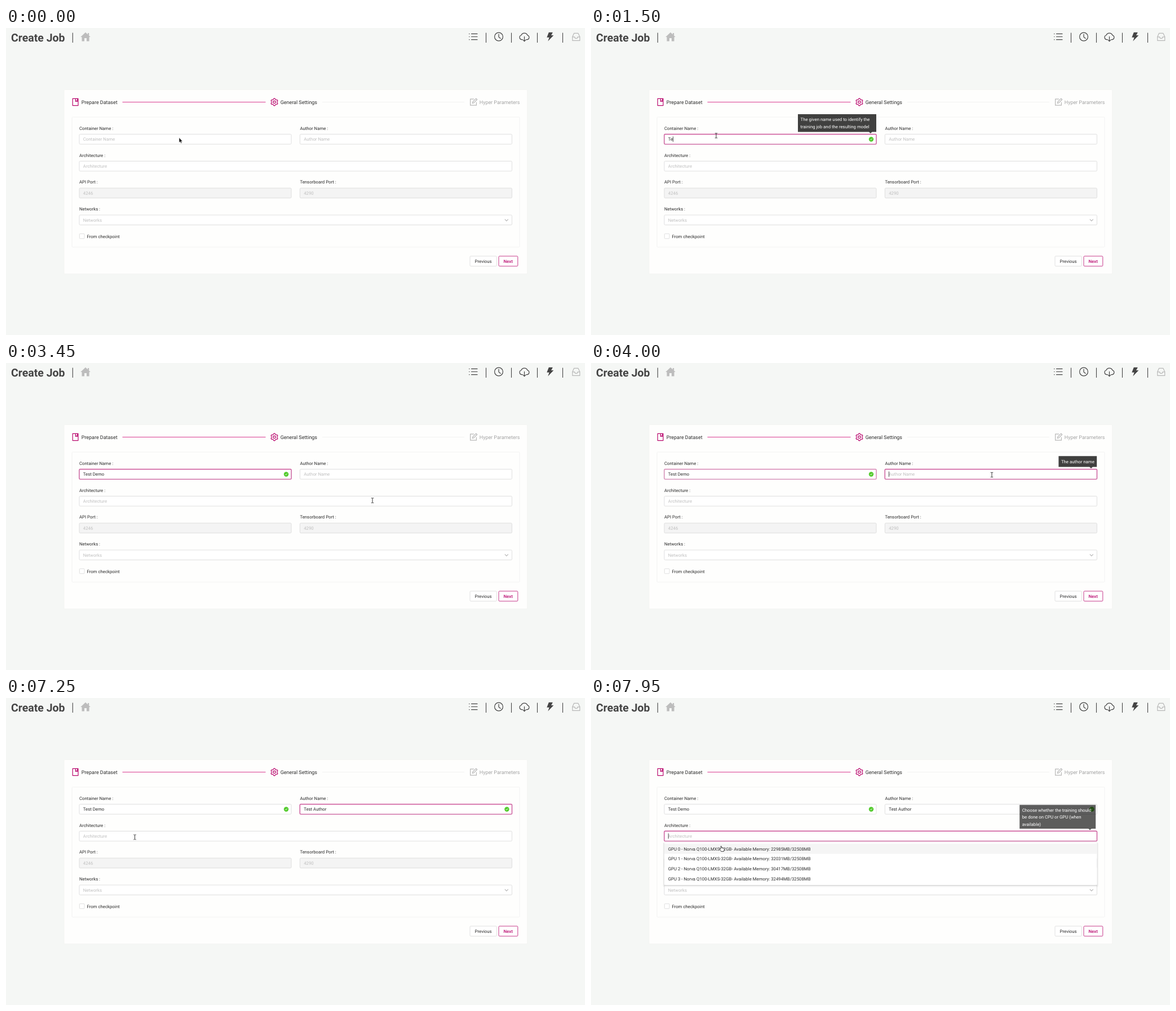
An HTML page for the animation above (8 s loop, 1027 by 545 pixels).

```html
<!DOCTYPE html>
<html lang="en">
<head>
<meta charset="utf-8">
<title>Create Job</title>
<style>
  html, body { margin: 0; width: 100%; height: 100%; overflow: hidden; background: #f5f7f5; }
  svg { display: block; width: 100vw; height: 100vh; }
  text { font: 7.8px Roboto, sans-serif; fill: #2b2b2b; white-space: pre; text-rendering: geometricPrecision; }
  .title { font-size: 19.5px; font-weight: 700; fill: #444; }
  .step { font-size: 8.93px; }
  .muted { fill: #a3a3a3; }
  .hint { fill: #bfbfbf; }
  .tip text { fill: #fff; }
  .line { fill: none; stroke: #444; stroke-width: 1.2; stroke-linecap: round; stroke-linejoin: round; }
  .pink { stroke: #b9086e; }
  .pale { stroke: #b8b8b8; }
  .box { fill: #fff; stroke: #d9d9d9; stroke-width: .8; }
  .off { fill: #f4f4f4; }
  .ring { fill: none; stroke: #c94792; stroke-width: 1.1; }
  .glow { fill: none; stroke: #b9086e; stroke-opacity: .22; stroke-width: 1.2; }
  .caret { fill: #222; }
</style>
</head>
<body>
<svg viewBox="0 0 1027 545" preserveAspectRatio="none">
  <text class="title" x="9" y="24">Create Job</text>
  <path d="M118.3 8.5V26M851.5 8.5V26M896.5 8.5V26M942.5 8.5V26M987.5 8.5V26" stroke="#444" stroke-width="1.1"/>
  <path d="M141 7.8 149.8 16H147.6V23.5H143V18H139V23.5H134.5V16H132.3ZM145 9H147.2V13.4L145 11.4Z" fill="#bdbdbd"/>
  <path class="line" d="M825.5 10.3H836M825.5 15.5H836M825.5 20.7H836M821.6 10.3H822M821.6 15.5H822M821.6 20.7H822" stroke-width="1.5"/>
  <g class="line">
    <circle cx="874" cy="15.5" r="7.4"/>
    <path d="M874 11V16L877.2 18.4"/>
    <path d="M916.3 20.6H914.6A4 4 0 0 1 913.9 12.8A6 6 0 0 1 925 12.8A4 4 0 0 1 924.4 20.6H922.7M919.5 15.4V23.5M917.3 21.4 919.5 23.7 921.7 21.4"/>
  </g>
  <path d="M962.8 7.8H969.8L967 13H971.3L961.3 23.4 963.6 16.8H959.3Z" fill="#444"/>
  <path class="line pale" d="M1004.8 15.6 1007.6 9.3H1014.8L1017.8 15.6V22.3H1004.8ZM1004.8 15.8H1008.6Q1009 18.5 1011.3 18.5T1014 15.8H1017.8"/>

  <rect x="103" y="109.5" width="821.5" height="327" rx="1.5" fill="#fefefd" stroke="#f0f1ef" stroke-width=".6"/>
  <path class="line pink" d="M118.2 125.4H128V137.6H118.2ZM123.4 125.4V130.4L125 129.2 126.6 130.4V125.4"/>
  <text class="step" x="133.8" y="134.8">Prepare Dataset</text>
  <path d="M206.5 131.6H460.5" stroke="#d9378f"/>
  <path id="gear" class="line pink"/>
  <circle class="line pink" cx="476" cy="131.5" r="2.2"/>
  <text class="step" x="486.8" y="134.8">General Settings</text>
  <path d="M561 131.6H813" stroke="#efefef" stroke-width=".8"/>
  <path class="line pale" d="M834.4 132V137.2H823.6V126.2H829.6M827.4 133.6 828 131 833.8 125.2 835.6 127 829.9 132.8Z" stroke-width="1"/>
  <text class="step muted" x="839.8" y="134.8">Hyper Parameters</text>
  <rect x="117" y="158" width="794" height="231" rx="1.5" fill="none" stroke="#efefef" stroke-width=".8"/>

  <g id="form"></g>
  <path class="line pale" d="M885.2 339.8 887.8 342.6 890.4 339.8" stroke-width=".9"/>
  <rect class="box" x="130.4" y="365.2" width="8.6" height="8.6" rx="1"/>
  <text x="143.4" y="372.5">From checkpoint</text>
  <rect class="box" x="823" y="405" width="47.3" height="17.8" rx="1.6"/>
  <text x="831.6" y="416.8">Previous</text>
  <rect class="box" x="874" y="405" width="33.8" height="17.8" rx="1.6" style="stroke:#b9086e"/>
  <text x="882.5" y="416.8" style="fill:#b9086e;font-weight:500">Next</text>

  <g id="menu"></g>
  <g id="tips"></g>
  <g id="cursor">
    <path data-kind="arrow" d="M0 0V9L2 7.2 3.4 10.2 4.9 9.6 3.6 6.7H6.2Z" fill="#111" stroke="#fff" stroke-width=".6"/>
    <path data-kind="beam" d="M-2.2-4.2H-.7L0-3.7 .7-4.2H2.2M0-3.7V3.7M-2.2 4.2H-.7L0 3.7 .7 4.2H2.2" fill="none" stroke="#222" stroke-width=".9"/>
    <path data-kind="hand" d="M-2-4.2Q-1.2-5-.5-4.2V-1.6L3.6-.8Q4.4-.5 4.3 1L3.6 5H-1.2L-4-.2Q-3.6-1.4-2 .4Z" fill="#fff" stroke="#222" stroke-width=".8"/>
  </g>
</svg>
<script>
const LOOP = 8000, STEP = 50;
const $ = id => document.getElementById(id);
const ramp = (t, a, b) => Math.min(1, Math.max(0, (t - a) / (b - a)));
const easeOut = p => 1 - (1 - p) ** 3;
const pulse = (t, a, b, c, d) => easeOut(ramp(t, a, b)) * (1 - ramp(t, c, d));

$('gear').setAttribute('d', 'M' + Array.from({ length: 24 }, (_, i) => {
  const a = i * Math.PI / 12, r = i % 4 < 2 ? 6.4 : 5;
  return `${476 + r * Math.sin(a - .13)} ${131.5 - r * Math.cos(a - .13)}`;
}).join('L') + 'Z');

const fields = [
  { label: 'Container Name', x: 130, y: 188.6, w: 376, focus: [550, 800, 3900, 4200], check: 1250,
    keys: [[1250, 'T'], [1400, 'Te'], [1550, 'Tes'], [1650, 'Test'], [2350, 'Test D'],
      [2550, 'Test De'], [2650, 'Test Dem'], [2750, 'Test Demo']],
    caret: [[550, 1100], [1250, 2000], [2350, 3250]] },
  { label: 'Author Name', x: 521.4, y: 188.6, w: 376, focus: [3850, 4050, 7400, 7700], check: 4550,
    keys: [[4550, 'T'], [4700, 'Te'], [4850, 'Tes'], [4950, 'Test'], [5350, 'Test '], [5550, 'Test A'],
      [5700, 'Test Au'], [5850, 'Test Aut'], [5900, 'Test Auth'], [6050, 'Test Autho'], [6150, 'Test Author']],
    caret: [[3900, 6750], [7300, 7400]] },
  { label: 'Architecture', x: 130, y: 236.4, w: 767.4, focus: [7400, 7650, 9000, 9100], caret: [[7400, LOOP]] },
  { label: 'API Port', hint: '4246', off: true, x: 130, y: 284.2, w: 376 },
  { label: 'Tensorboard Port', hint: '4290', off: true, x: 521.4, y: 284.2, w: 376 },
  { label: 'Networks', x: 130, y: 332, w: 767.4 }
];

$('form').innerHTML = fields.map(({ label, hint = label, off, x, y, w }) => `<g>
  <text x="${x}" y="${y - 7.8}">${label} :</text>
  <rect class="glow" x="${x - .5}" y="${y - .5}" width="${w + 1}" height="18.6" rx="2" opacity="0"/>
  <rect class="box ${off ? 'off' : ''}" x="${x}" y="${y}" width="${w}" height="17.6" rx="1.6"/>
  <rect class="ring" x="${x}" y="${y}" width="${w}" height="17.6" rx="1.6" opacity="0"/>
  <text class="hint" x="${x + 6.8}" y="${y + 11.7}">${hint}</text>
  <text class="value" x="${x + 6.8}" y="${y + 11.7}"></text>
  <g class="check"><circle r="4.2" fill="#52cb2c"/><path d="M-1.8 0-.5 1.4 1.9-1.3" fill="none" stroke="#fff" stroke-width=".9"/></g>
  <rect class="caret" y="${y + 4}" width=".8" height="9.4"/>
</g>`).join('');
[...$('form').children].forEach((g, i) => {
  for (const part of ['ring', 'glow', 'hint', 'value', 'check', 'caret'])
    fields[i][part + 'El'] = g.querySelector('.' + part);
});

const memory = [22985, 32031, 30417, 32494];
$('menu').innerHTML = [7, 4.5, 2].map(s =>
  `<rect x="${130 - s / 3}" y="256.4" width="${767.6 + s / 1.5}" height="${75.6 + s / 2}" rx="2" fill="#000" opacity=".04"/>`).join('') +
  '<rect x="130" y="256.4" width="767.6" height="75.6" rx="1.6" fill="#fff"/>' +
  '<rect x="130" y="258.8" width="767.6" height="17.8" fill="#f5f5f5"/>' +
  memory.map((free, i) =>
    `<text x="136.8" y="${270.5 + 17.83 * i}">GPU ${i} - Norva Q100-LMXS-32GB- Available Memory: ${free}MB/32508MB</text>`).join('');

const tips = [
  { x: 367, y: 153, w: 139, h: 31.4, show: [500, 600, 3300, 3400],
    lines: ['The given name used to identify the', 'training job and the resulting model'] },
  { x: 829.4, y: 165.2, w: 67.8, h: 19.2, show: [3800, 3900, 6950, 7050], lines: ['The author name'] },
  { x: 760.2, y: 189.8, w: 135, h: 42.2, show: [7350, 7450, 7930, 8060],
    lines: ['Choose whether the training should', 'be done on CPU or GPU (when', 'available)'] }
];
$('tips').innerHTML = tips.map(({ x, y, w, h, lines }) => `<g class="tip">
  <path d="M${x} ${y}h${w}v${h}h-7.4l-2.8 2.6-2.8-2.6H${x}Z" fill="#000" fill-opacity=".75" stroke-linejoin="round"/>
  ${lines.map((s, i) => `<text x="${x + 4.5}" y="${y + 12.3 + 12.2 * i}">${s}</text>`).join('')}
</g>`).join('');
tips.forEach((tip, i) => tip.el = $('tips').children[i]);

// Pointer path: time, x, y
const path = [
  [50, 307, 194.5], [100, 262, 234], [200, 227, 226], [300, 227, 226], [400, 223, 201], [500, 222, 191],
  [3150, 222, 191], [3250, 245, 220], [3350, 400, 252], [3450, 650, 244], [3550, 780, 207],
  [3650, 780, 207], [3750, 735, 201], [3850, 711, 198.5], [4050, 711, 198.5], [4150, 708, 196],
  [6700, 708, 196], [6900, 590, 213], [7050, 400, 238], [7200, 240, 247], [7250, 228.5, 247],
  [7550, 228.5, 247], [7700, 229, 257], [7850, 231, 267], [7950, 232, 267.5]
];
const pointer = t => {
  const i = path.findIndex(p => p[0] > t);
  if (i < 1) return path[i < 0 ? path.length - 1 : 0].slice(1);
  const [a, x, y] = path[i - 1], [b, x2, y2] = path[i], p = ramp(t, a, b);
  return [x + (x2 - x) * p, y + (y2 - y) * p];
};
const pointerKind = (t, y) => {
  if (t > 7550 && y > 256) return 'hand';
  const inField = (y > 188 && y < 207) || (y > 236 && y < 255);
  return t >= 300 && inField ? 'beam' : 'arrow';
};

function drawField(f, t) {
  if (!f.focus) {
    f.checkEl.style.display = f.caretEl.style.display = 'none';
    return;
  }
  const focus = pulse(t, ...f.focus);
  f.ringEl.setAttribute('opacity', focus);
  f.glowEl.setAttribute('opacity', focus);
  const typed = (f.keys || []).filter(k => k[0] <= t).pop();
  const value = typed ? typed[1] : '';
  f.valueEl.textContent = value;
  f.hintEl.style.display = value ? 'none' : '';
  const grow = f.check ? easeOut(ramp(t, f.check, f.check + 250)) : 0;
  f.checkEl.style.display = grow ? '' : 'none';
  f.checkEl.setAttribute('transform', `translate(${f.x + f.w - 9} ${f.y + 8.9}) scale(${grow})`);
  const width = value ? f.valueEl.getComputedTextLength() : 0;
  f.caretEl.setAttribute('x', f.x + 6.8 + width);
  f.caretEl.style.display = f.caret.some(([a, b]) => t >= a && t < b) ? '' : 'none';
}

function draw(t) {
  fields.forEach(f => drawField(f, t));

  for (const { el, x, y, w, h, show } of tips) {
    const scale = .8 + .2 * ramp(t, show[0], show[1]), px = x + w - 10, py = y + h + 2;
    el.setAttribute('opacity', pulse(t, ...show));
    el.setAttribute('transform', `translate(${px} ${py}) scale(${scale}) translate(${-px} ${-py})`);
  }

  const open = easeOut(ramp(t, 7400, 7600));
  $('menu').setAttribute('opacity', open);
  $('menu').setAttribute('transform', `translate(0 256.4) scale(1 ${.8 + .2 * open}) translate(0 -256.4)`);

  const [x, y] = pointer(t), kind = pointerKind(t, y);
  $('cursor').setAttribute('transform', `translate(${x} ${y})`);
  for (const el of $('cursor').children) el.style.display = el.dataset.kind === kind ? '' : 'none';
}

function tick() {
  draw(Math.floor(performance.now() % LOOP / STEP) * STEP);
  requestAnimationFrame(tick);
}
tick();
</script>
</body>
</html>
```
